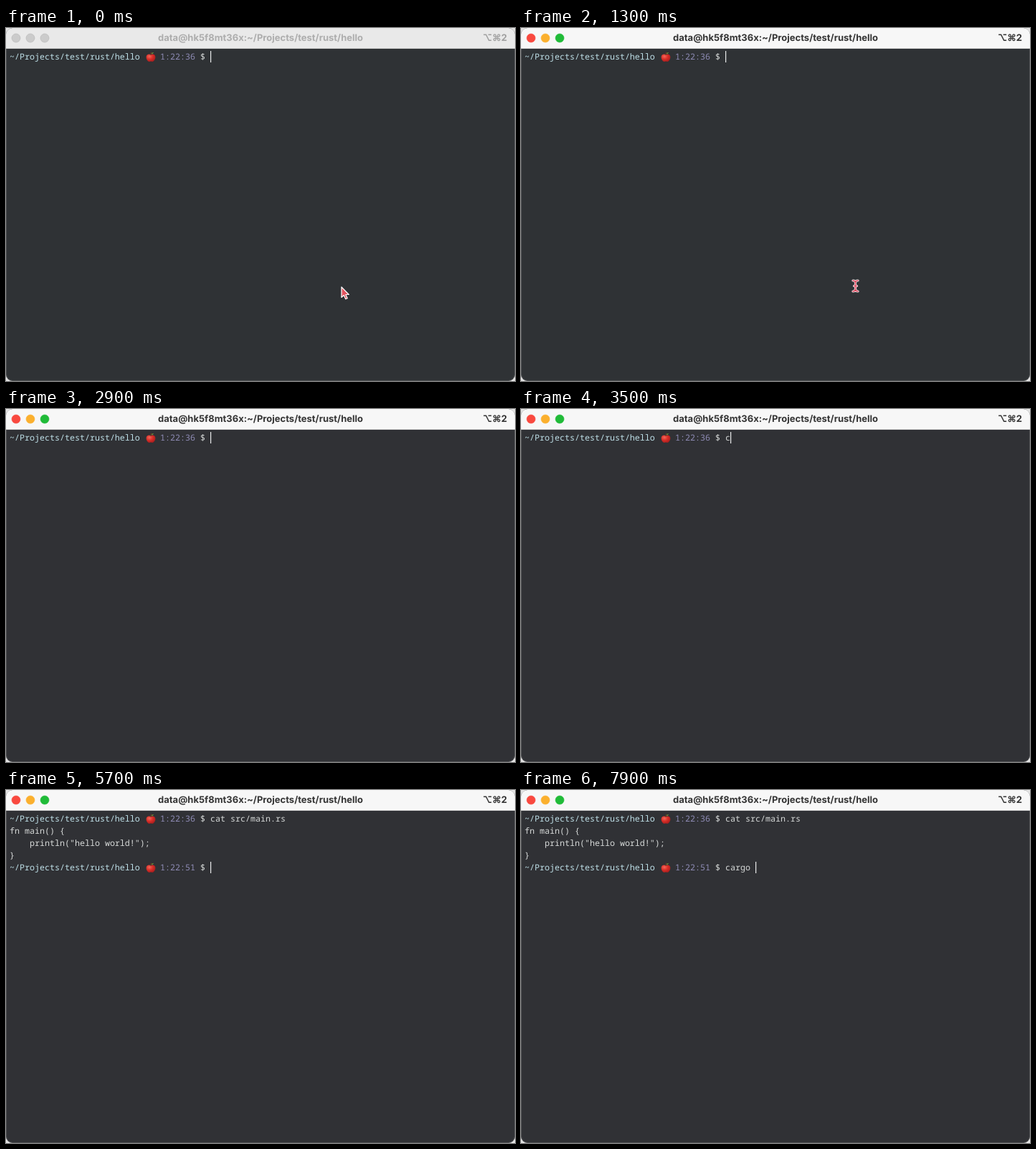
An HTML page that plays this animation: 710x492 px, repeating every 8000 ms.

```html
<!DOCTYPE html>
<html lang="en">
<head>
<meta charset="utf-8">
<title>Terminal</title>
<style>
  html, body { margin: 0; width: 100%; height: 100%; overflow: hidden; background: #e6e6e6; }
  svg { display: block; width: 710px; height: 492px; }
  text {
    font: 11.667px "Noto Sans Mono", "DejaVu Sans Mono", monospace;
    fill: #d6d9d8;
    white-space: pre;
    text-rendering: geometricPrecision;
  }
  .bar text { font: 700 13px Inter, "DejaVu Sans", sans-serif; fill: inherit; }
  .path { fill: #bfe0e8; }
  .clock { fill: #8f8cb6; }
</style>
</head>
<body>
<svg viewBox="0 0 710 492">
  <defs>
    <clipPath id="win"><rect width="710" height="492" rx="9"/></clipPath>
    <radialGradient id="skin" cx=".35" cy=".3" r=".8">
      <stop offset="0" stop-color="#f4685a"/>
      <stop offset=".45" stop-color="#d92f28"/>
      <stop offset="1" stop-color="#a01a1c"/>
    </radialGradient>
    <g id="apple">
      <path d="M7 4.2C5 2.9 .6 3.2 .6 7.6C.6 11 3 14 5 14C6 14 6.3 13.6 7 13.6C7.7 13.6 8 14 9 14C11 14 13.4 11 13.4 7.6C13.4 3.2 9 2.9 7 4.2Z" fill="url(#skin)"/>
      <path d="M7 4.8Q6.8 2.5 7.8 .8" fill="none" stroke="#6b3a22" stroke-width="1.2"/>
      <path d="M7.6 3.2Q8.4 .9 11 1Q10.4 3.2 7.6 3.2Z" fill="#6f9a3c"/>
    </g>
    <g id="prompt">
      <text class="path" x="5">~/Projects/test/rust/hello</text>
      <use href="#apple" x="195" y="-11"/>
      <text x="271">$</text>
    </g>
    <path id="beamShape" d="M463 352Q466.500 352 466.500 355V364Q466.500 367 463 367M470 352Q466.500 352 466.500 355M466.500 364Q466.500 367 470 367M464.500 359.500H468.500"/>
  </defs>
  <g clip-path="url(#win)">
    <rect id="back" width="710" height="492"/>
    <g class="bar">
      <rect id="head" width="710" height="28"/>
      <rect id="rule" y="28" width="710" height="1"/>
      <g id="lights"></g>
      <g id="title"><text x="355" y="18" text-anchor="middle">data@hk5f8mt36x:~/Projects/test/rust/hello</text></g>
      <g id="keys"><text x="699" y="18" text-anchor="end">⌥⌘2</text></g>
    </g>
    <use href="#prompt" y="44"/>
    <text class="clock" x="215" y="44">1:22:36</text>
    <text id="cmd1" x="285" y="44"></text>
    <g id="output">
      <text x="5" y="61">fn main() {</text>
      <text x="5" y="78">    println("hello world!");</text>
      <text x="5" y="95">}</text>
      <use href="#prompt" y="112"/>
      <text class="clock" x="215" y="112">1:22:51</text>
      <text id="cmd2" x="285" y="112"></text>
    </g>
    <rect id="caret" width="1.2" height="16" fill="#e9eaea"/>
    <path d="M.5 29V483A8.500 8.500 0 0 0 9 491.500H701A8.500 8.500 0 0 0 709.500 483V29" fill="none" stroke="#a0a0a0" stroke-opacity=".3"/>
  </g>
  <path id="arrow" d="M468 361V375.500L471.300 372.400L473.700 377.800L476.200 376.700L473.900 371.500H478.300Z" fill="#e2545f" stroke="#fff" stroke-width="1.2" stroke-linejoin="round"/>
  <g id="beam" fill="none" stroke-linecap="round">
    <use href="#beamShape" stroke="#fff" stroke-width="3.2"/>
    <use href="#beamShape" stroke="#dc4b60" stroke-width="1.7"/>
  </g>
</svg>
<script>
const LOOP = 8000, COL = 7, START_X = 285;
const FOCUS = 200, HIDE = 1600, ENTER = 5700;
const $ = id => document.getElementById(id);
const set = (el, attrs) => Object.entries(attrs).forEach(([k, v]) => el.setAttribute(k, v));
const show = (id, on) => set($(id), { display: on ? "inline" : "none" });

// [time, text on the command line from then on]
const first = [
  [0, ""], [1600, "v"], [1800, "vi"], [2500, "v"], [2700, ""],
  [3200, "c"], [3800, "ca"], [3900, "cat"], [4000, "cat "],
  [4200, "cat s"], [4300, "cat sr"], [4400, "cat src"], [4600, "cat src/"],
  [5200, "cat src/m"], [5400, "cat src/main.rs"]
];
const second = [
  [0, ""], [7000, "c"], [7100, "ca"], [7200, "car"],
  [7300, "carg"], [7400, "cargo"], [7600, "cargo "]
];
const at = (steps, t) => steps.filter(s => s[0] <= t).pop()[1];

const colors = ["#f9493f", "#fbb02e", "#20bb38"];
const lights = colors.map((c, i) => {
  const el = document.createElementNS("http://www.w3.org/2000/svg", "circle");
  set(el, { cx: 14 + 20 * i, cy: 14, r: 6, "stroke-width": .6 });
  return $("lights").appendChild(el);
});

function draw(t) {
  const active = t >= FOCUS, done = t >= ENTER;
  set($("back"), { fill: t < HIDE ? "#2f3235" : "#303135" });
  set($("head"), { fill: active ? "#f7f7f7" : "#e9e9e9" });
  set($("rule"), { fill: active ? "#c9c9c9" : "#c4c4c4" });
  set($("title"), { fill: active ? "#343434" : "#adadad" });
  set($("keys"), { fill: active ? "#343434" : "#a0a0a0" });
  lights.forEach((el, i) => set(el, {
    fill: active ? colors[i] : "#cbcbcb",
    stroke: active ? colors[i] : "#b5b5b5"
  }));

  const a = at(first, t), b = at(second, t);
  $("cmd1").textContent = a;
  $("cmd2").textContent = b;
  show("output", done);
  set($("caret"), { x: START_X + COL * (done ? b : a).length, y: done ? 100 : 32 });

  show("arrow", !active);
  show("beam", active && t < HIDE);
}

const begin = performance.now();
function tick() {
  draw((performance.now() - begin) % LOOP);
  requestAnimationFrame(tick);
}
tick();
</script>
</body>
</html>
```
